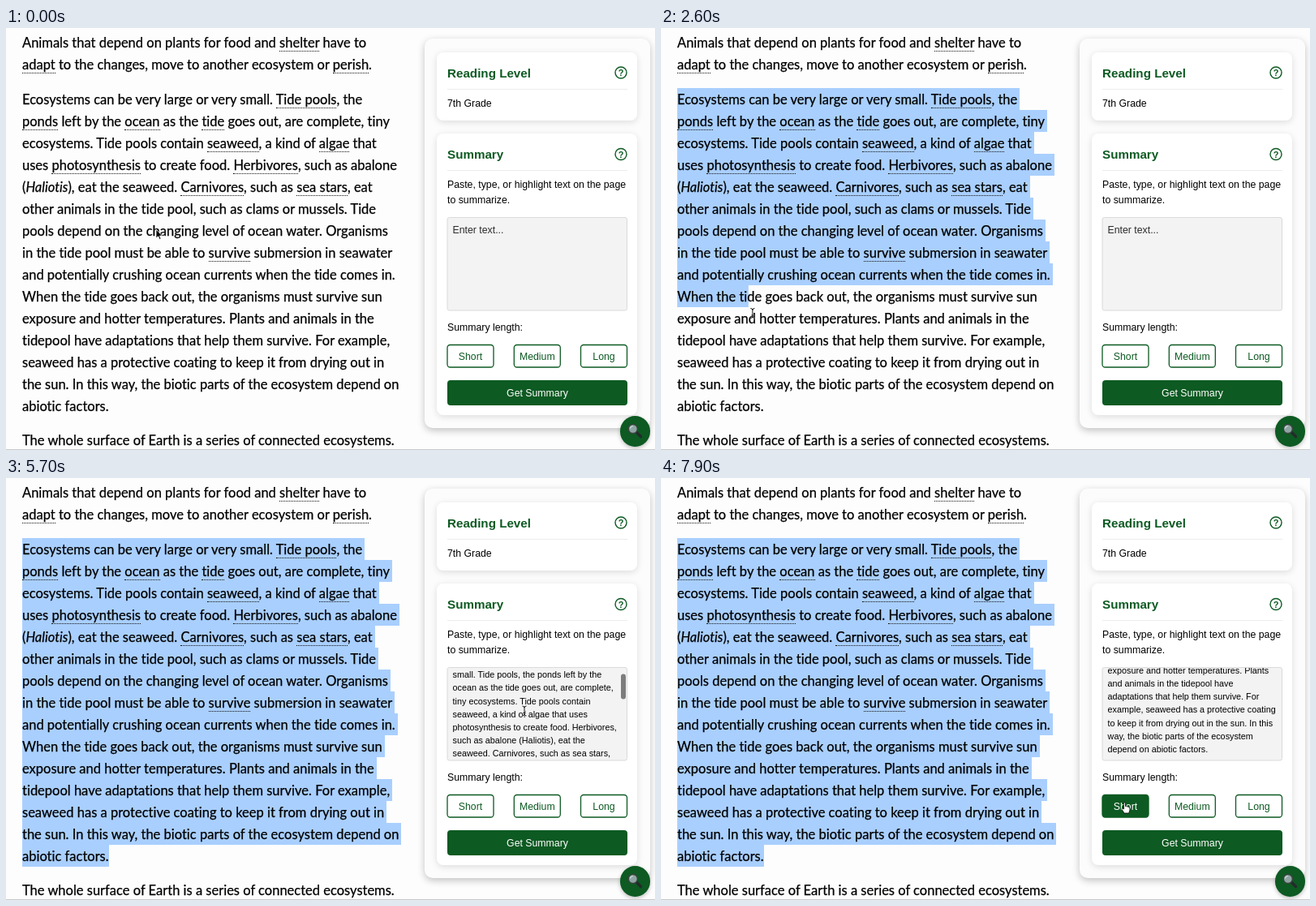
An HTML page for the animation above (8 s loop, 800x520 px).

```html
<!DOCTYPE html>
<html lang="en">
<head>
<meta charset="utf-8">
<title>Reading helper</title>
<style>
  html, body { margin: 0; width: 800px; height: 520px; overflow: hidden; background: #fdfdfd; }
  body { position: relative; }
  .line {
    position: absolute; left: 20px; padding-right: 3px; white-space: pre;
    font: 16.5px/27px Lato, "Open Sans", sans-serif; color: #000;
    font-variant-ligatures: none; -webkit-text-stroke: .25px #000;
    background: linear-gradient(#a9cffe, #a9cffe) no-repeat 0 0 / 0 100%;
  }
  .line span { position: relative; top: .7px; }
  .line.end { padding-right: 0; }
  .line u { text-decoration: none; border-bottom: 1px dotted #111; }
  .box { position: absolute; box-sizing: border-box; }
  .panel { left: 516px; top: 13px; width: 278px; height: 480px; border-radius: 10px; background: #fcfcfc; box-shadow: 0 3px 10px rgba(0,0,0,.24); }
  .card { left: 531px; width: 247px; border-radius: 8px; background: #fff; box-shadow: 0 2px 8px rgba(0,0,0,.13); }
  .fab { left: 756.5px; top: 478px; width: 37.5px; height: 37.5px; border-radius: 50%; background: #0d5a22; box-shadow: 0 2px 5px rgba(0,0,0,.25); }
  .foot { left: 0; top: 519px; width: 800px; height: 1px; background: #c9c9c9; }
  svg.ui { position: absolute; left: 0; top: 0; font: 12.3px "Liberation Sans", Arial, sans-serif; }
  .head { font-size: 15.2px; font-weight: bold; fill: #0d5a22; }
  .mid { text-anchor: middle; }
  .green { fill: #0d5a22; }
  .copy { font-size: 10.8px; }
  .btn rect { fill: #fff; stroke: #0d5a22; stroke-width: 1.3; }
  .btn text { fill: #0d5a22; }
  .btn.on rect { fill: #0d5a22; }
  .btn.on text { fill: #fff; }
</style>
</head>
<body>
<div class="box panel"></div>
<div class="box card" style="top:30px;height:84px"></div>
<div class="box card" style="top:130px;height:347px"></div>
<div class="box fab"></div>
<div class="box foot"></div>

<svg class="ui" width="800" height="520">
  <path d="M544 75.5H766M544 175.5H766" stroke="#ececec"/>
  <text class="head" x="544" y="60.5">Reading Level</text>
  <text class="head" x="544" y="161">Summary</text>
  <g id="help">
    <circle cx="758" cy="55" r="7" fill="none" stroke="#0d5a22" stroke-width="1.4"/>
    <text class="mid green" x="758" y="59" font-size="11" font-weight="bold">?</text>
  </g>
  <use href="#help" y="100.5"/>
  <text x="544" y="97">7th Grade</text>
  <text x="544" y="197.3">Paste, type, or highlight text on the page</text>
  <text x="544" y="216">to summarize.</text>

  <rect x="544" y="233.5" width="221.5" height="114.5" rx="2.5" fill="#f3f3f3" stroke="#dadada"/>
  <text id="hint" x="550.5" y="252.7" fill="#2b2b2b">Enter text...</text>
  <svg x="544" y="234" width="222" height="114">
    <g id="copy" class="copy"></g>
    <rect id="thumb" x="214" width="6" height="31" rx="3" fill="#7d7d7d"/>
  </svg>

  <text x="544" y="373">Summary length:</text>
  <g class="btn" id="short"><rect x="544" y="390.5" width="57" height="27.5" rx="3.5"/><text class="mid" x="572.5" y="408.5">Short</text></g>
  <g class="btn"><rect x="626.3" y="390.5" width="57" height="27.5" rx="3.5"/><text class="mid" x="654.8" y="408.5">Medium</text></g>
  <g class="btn"><rect x="708.5" y="390.5" width="57" height="27.5" rx="3.5"/><text class="mid" x="737" y="408.5">Long</text></g>
  <rect class="green" x="544" y="434" width="222" height="31" rx="4"/>
  <text class="mid" x="655" y="453.5" fill="#fff">Get Summary</text>

  <path d="M777.5 498.5L782.5 503.5" stroke="#252a2c" stroke-width="3.2" stroke-linecap="round"/>
  <circle cx="772.8" cy="494" r="5.6" fill="#8fa5a3" stroke="#39443f" stroke-width="1.5"/>
  <path d="M769.5 493.5A3.5 3.5 0 0 1 773 490.5" fill="none" stroke="#d3dfdd" stroke-width="1.2"/>
</svg>

<svg class="ui" width="800" height="520">
  <g id="cursor">
    <path id="arrow" d="M0 0V11L2.6 8.7 4.3 12.5 6 11.8 4.4 8.1H7.6Z" stroke="#fff" stroke-width=".8"/>
    <g id="beam" fill="none">
      <path d="M-2.5-6Q0-6 0-4Q0-6 2.5-6M0-5V5M-2.5 6Q0 6 0 4Q0 6 2.5 6M-1.5 2.5H1.5" stroke="#fff" stroke-width="2.2" opacity=".7"/>
      <path d="M-2.5-6Q0-6 0-4Q0-6 2.5-6M0-5V5M-2.5 6Q0 6 0 4Q0 6 2.5 6M-1.5 2.5H1.5" stroke="#111"/>
    </g>
    <path id="hand" d="M-1 .5Q0 -.7 1 .5V4.5Q2.2 3.8 3 5Q4.2 4.4 4.8 5.6Q6.4 5.2 6.4 7V9.5Q5.6 11 5.4 13H-.8Q-1.6 10.6 -3.6 8.2Q-3.6 6 -1 8Z" fill="#fff" stroke="#111" stroke-width=".9"/>
  </g>
</svg>

<script>
const LOOP = 8000, STEP = 100, LINE = 27, TOP = 74, LEFT = 20;
const $ = id => document.getElementById(id);

// _word_ is a glossary term, *word* is italic
const intro = `Animals that depend on plants for food and _shelter_ have to
_adapt_ to the changes, move to another ecosystem or _perish_.`;
const main = `Ecosystems can be very large or very small. _Tide pools_, the
_ponds_ left by the _ocean_ as the _tide_ goes out, are complete, tiny
ecosystems. Tide pools contain _seaweed_, a kind of _algae_ that
uses _photosynthesis_ to create food. _Herbivores_, such as abalone
(*Haliotis*), eat the seaweed. _Carnivores_, such as _sea stars_, eat
other animals in the tide pool, such as clams or mussels. Tide
pools depend on the changing level of ocean water. Organisms
in the tide pool must be able to _survive_ submersion in seawater
and potentially crushing ocean currents when the tide comes in.
When the tide goes back out, the organisms must survive sun
exposure and hotter temperatures. Plants and animals in the
tidepool have adaptations that help them survive. For example,
seaweed has a protective coating to keep it from drying out in
the sun. In this way, the biotic parts of the ecosystem depend on
abiotic factors.`;
const outro = 'The whole surface of Earth is a series of connected ecosystems.';
const pasted = `Ecosystems can be very large or very
small. Tide pools, the ponds left by the
ocean as the tide goes out, are complete,
tiny ecosystems. Tide pools contain
seaweed, a kind of algae that uses
photosynthesis to create food. Herbivores,
such as abalone (Haliotis), eat the
seaweed. Carnivores, such as sea stars,
eat other animals in the tide pool, such as
clams or mussels. Tide pools depend on
the changing level of ocean water.
Organisms in the tide pool must be able to
survive submersion in seawater and
potentially crushing ocean currents when
the tide comes in. When the tide goes back
out, the organisms must survive sun
exposure and hotter temperatures. Plants
and animals in the tidepool have
adaptations that help them survive. For
example, seaweed has a protective coating
to keep it from drying out in the sun. In this
way, the biotic parts of the ecosystem
depend on abiotic factors.`;

function addLines(text, top) {
  return text.split('\n').map((s, i, all) => {
    const div = document.createElement('div');
    div.className = i === all.length - 1 ? 'line end' : 'line';
    div.style.top = top + i * LINE + 'px';
    const html = s.replace(/_(.+?)_/g, '<u>$1</u>').replace(/\*(.+?)\*/g, '<i>$1</i>');
    div.innerHTML = `<span>${html}</span>`;
    document.body.prepend(div);
    return div;
  });
}
addLines(intro, 4);
const lines = addLines(main, TOP);
addLines(outro, 494.5);
$('copy').innerHTML = pasted.split('\n')
  .map((s, i) => `<text x="6.6" y="${18 + i * 16.2}">${s}</text>`).join('');

// Keys are [time, ...values], joined linearly
const path = [[0, 185, 248], [700, 24, 86], [1200, 20, 86], [2100, 71, 214], [2900, 138, 434],
  [3100, 138.5, 435], [3500, 138, 463], [4100, 138, 463], [5200, 639, 287], [5700, 639, 287],
  [6400, 636, 293], [6900, 636, 293], [7500, 571.5, 400], [8000, 571.5, 400]];
const scroll = [[0, 0], [5500, 0], [5700, 22], [6400, 168], [6900, 270.4], [8000, 270.4]];

function at(keys, t) {
  const i = Math.max(1, keys.findIndex(k => k[0] >= t));
  const [a, b] = [keys[i - 1], keys[i]];
  const p = Math.max(0, (t - a[0]) / (b[0] - a[0]));
  return a.slice(1).map((v, j) => v + (b[j + 1] - v) * p);
}
const show = (id, on) => $(id).setAttribute('visibility', on ? 'visible' : 'hidden');
const move = (id, x, y) => $(id).setAttribute('transform', `translate(${x} ${y})`);

function draw(t) {
  const [x, y] = at(path, t);

  // The selection trails the pointer slightly
  const [sx, sy] = at(path, Math.min(t - 60, 3600));
  const row = Math.floor((sy - TOP) / LINE);
  lines.forEach((el, i) => {
    const full = el.offsetWidth;
    const w = t < 1200 || i > row ? 0 : i < row ? full : Math.min(full, sx - LEFT);
    el.style.backgroundSize = w + 'px 100%';
  });

  const filled = t >= 3700;
  const [s] = at(scroll, t);
  show('hint', !filled);
  show('copy', filled);
  move('copy', 0, -s);
  show('thumb', t > 5500 && t < 7400);
  move('thumb', 0, 1 + s * .296);

  const inField = x > 544 && x < 766 && y > 233 && y < 348;
  const hover = x > 544 && x < 601 && y > 390 && y < 418;
  const beam = inField || t >= 2200 && t < 3300;
  $('short').classList.toggle('on', hover);
  show('beam', beam);
  show('hand', hover);
  show('arrow', !beam && !hover);
  move('cursor', x, y);
}

const start = performance.now();
function tick() {
  const t = (performance.now() - start) % LOOP;
  draw(Math.floor(t / STEP) * STEP);
  requestAnimationFrame(tick);
}
tick();
</script>
</body>
</html>
```
